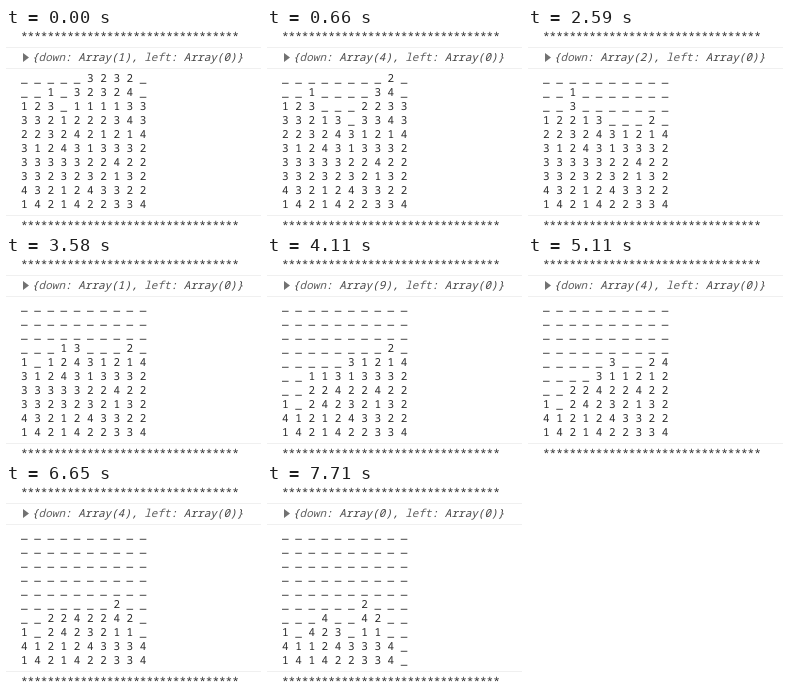
Recreate the animation shown at these times as an HTML page. Size 255x200 px, loop 8000 ms.

```html
<!DOCTYPE html>
<html lang="en">
<head>
<meta charset="utf-8">
<title>Console tile game</title>
<style>
  html, body { margin: 0; width: 100%; height: 100%; overflow: hidden; background: #fff; }
  svg { display: block; width: 255px; height: 200px; }
  text {
    font: 11px "Noto Sans Mono", "Liberation Mono", monospace;
    fill: #2c2c2c;
    white-space: pre;
    text-rendering: geometricPrecision;
  }
  .head { font-style: italic; fill: #444; }
  .key { fill: #606060; }
  .rule { fill: #f0f0f0; }
  .arrow { fill: #727272; }
</style>
</head>
<body>
<svg viewBox="0 0 255 200">
  <rect class="rule" y="19" width="255" height="1"/>
  <rect class="rule" y="40" width="255" height="1"/>
  <rect class="rule" y="187" width="255" height="1"/>
  <text class="stars" x="15" y="12"></text>
  <path class="arrow" d="M17 25L23 29.5L17 34Z"/>
  <text class="head" x="26" y="33">{<tspan class="key">down</tspan>: Array(<tspan id="down"></tspan>), <tspan class="key">left</tspan>: Array(<tspan id="left"></tspan>)}</text>
  <g id="board"></g>
  <text class="stars" x="15" y="201"></text>
</svg>
<script>
const LOOP = 8000, SIZE = 10, EMPTY = "_";

const START = `
_____3232_
__1_32324_
123_111133
3321222343
2232421214
3124313332
3333322422
3323232132
4321243322
1421422334`.trim().split("\n");

// Pauses between moves are uneven, so the move times are given.
const MOVES = [200, 660, 1260, 1720, 2130, 2590, 3120, 3580,
  4110, 4580, 5110, 5640, 6190, 6650, 7180, 7710];

// A board is a list of columns, each read from top to bottom.
const isTile = v => v !== EMPTY;
const sum = list => list.reduce((a, b) => a + b, 0);

function group(cols, r, c, value = cols[c][r], found = new Set()) {
  const id = c * SIZE + r;
  if (cols[c]?.[r] !== value || found.has(id)) return found;
  found.add(id);
  for (const [dr, dc] of [[-1, 0], [1, 0], [0, -1], [0, 1]]) {
    group(cols, r + dr, c + dc, value, found);
  }
  return found;
}

// Each move takes the topmost, then leftmost, group of matching tiles.
function pick(cols) {
  for (let r = 0; r < SIZE; r++) {
    for (let c = 0; c < SIZE; c++) {
      if (!isTile(cols[c][r])) continue;
      const found = group(cols, r, c);
      if (found.size > 1) return found;
    }
  }
  return new Set();
}

// Clears a group, drops tiles down, then closes empty columns to the left.
// "down" and "left" count the tiles that moved each way.
function play(cols) {
  const gone = pick(cols);
  let down = 0, left = 0;
  const tiles = cols.map((col, c) => {
    const isGone = r => gone.has(c * SIZE + r);
    const lowest = col.findLastIndex((_, r) => isGone(r));
    const kept = col.filter((v, r) => isTile(v) && !isGone(r));
    down += sum(col.map((v, r) => +(isTile(v) && !isGone(r) && r < lowest)));
    return kept;
  });
  const gap = tiles.findIndex(col => !col.length);
  if (gap >= 0) left = sum(tiles.slice(gap).map(col => col.length));

  const packed = tiles.filter(col => col.length);
  const next = Array.from({ length: SIZE }, (_, c) => {
    const col = packed[c] ?? [];
    return [...EMPTY.repeat(SIZE - col.length), ...col];
  });
  return { cols: next, down, left };
}

const states = [{
  time: 0, down: 1, left: 0,
  cols: [...START[0]].map((_, c) => START.map(row => row[c]))
}];
for (const time of MOVES) states.push({ time, ...play(states.at(-1).cols) });

const byId = id => document.getElementById(id);
const downText = byId("down"), leftText = byId("left");

document.querySelectorAll(".stars").forEach(el => el.textContent = "*".repeat(33));

const rows = START.map((_, r) => {
  const row = document.createElementNS("http://www.w3.org/2000/svg", "text");
  row.setAttribute("x", 15);
  row.setAttribute("y", 54 + 14 * r);
  return byId("board").appendChild(row);
});

let shown;
function show(state) {
  if (state === shown) return;
  shown = state;
  downText.textContent = state.down;
  leftText.textContent = state.left;
  rows.forEach((row, r) => row.textContent = state.cols.map(col => col[r]).join(" "));
}

const begin = performance.now();
function tick() {
  const t = (performance.now() - begin) % LOOP;
  show(states.findLast(s => s.time <= t));
  requestAnimationFrame(tick);
}
tick();
</script>
</body>
</html>
```
